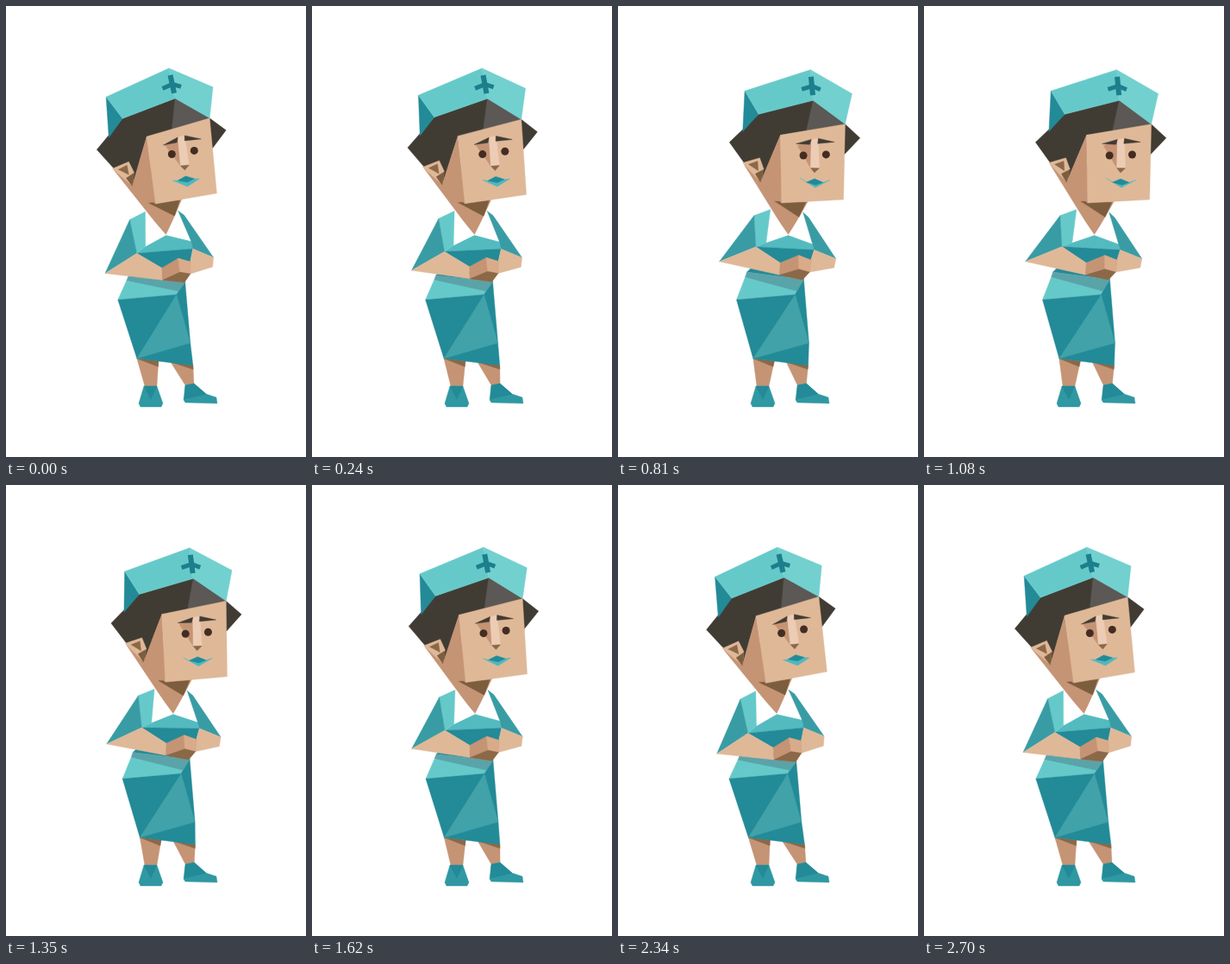
Animation of 348 by 522 pixels, one loop 3 s. Source, as an HTML page with a canvas:

```html
<!DOCTYPE html>
<html>
<head>
<meta charset="utf-8">
<style>
html, body { margin: 0; width: 100%; height: 100%; overflow: hidden; background: #fff; }
canvas { display: block; }
</style>
</head>
<body>
<canvas id="stage" width="348" height="522"></canvas>
<script>
const ctx = document.getElementById('stage').getContext('2d');
const STEP = 30, SWAY = 2700, LOOP = 3000;
const TEAL = '#238a97', MID = '#41a2a9', AQUA = '#66c9c9', PALE = '#72d0cf';
const SKIN = '#dfb898', TAN = '#c59475', BROWN = '#8a6848', OLIVE = '#7c5d3d', HAIR = '#403c34';

let lean = 0;
let warp;

const clamp = v => Math.max(0, Math.min(1, v));
const mix = (a, b, t) => [a[0] + (b[0] - a[0]) * t, a[1] + (b[1] - a[1]) * t];

// Head and neck turn rigidly about a point in the hips.
function turn([x, y]) {
  const angle = lean * 6.5 * Math.PI / 180;
  const dx = x - 191, dy = y - 367;
  return [191 + dx * Math.cos(angle) - dy * Math.sin(angle),
          367 + dx * Math.sin(angle) + dy * Math.cos(angle)];
}

// The chest turns too, while the folded arms rise and spread.
function chest([x, y]) {
  const rise = lean * clamp((y - 272) / 20);
  const [tx, ty] = turn([x, y]);
  return [tx + (x - 184) * 0.065 * rise, ty - 5 * rise];
}

// The hips slide over fixed feet and the waistband lifts.
function hips([x, y]) {
  return [x + lean * 7.5 * clamp((440 - y) / 50), y - lean * 5 * clamp((330 - y) / 15)];
}

function trace(points) {
  ctx.beginPath();
  for (const point of points) ctx.lineTo(...warp(point));
}

function facet(color, ...points) {
  trace(points);
  ctx.closePath();
  ctx.fillStyle = ctx.strokeStyle = color;
  ctx.lineWidth = 0.4;
  ctx.fill();
  ctx.stroke();
}

function bar(color, width, ...points) {
  trace(points);
  ctx.strokeStyle = color;
  ctx.lineWidth = width;
  ctx.stroke();
}

function dot(color, center, r) {
  ctx.beginPath();
  ctx.arc(...warp(center), r, 0, 7);
  ctx.fillStyle = color;
  ctx.fill();
}

function leg(hemLeft, hemRight, ankleRight, ankleLeft) {
  facet(TAN, hemLeft, hemRight, ankleRight, ankleLeft);
  facet(BROWN, hemLeft, hemRight, mix(hemRight, ankleRight, 0.22));
}

function lowerBody() {
  warp = hips;
  const heel = [160, 440], ankle = [175, 440], cuff = [208, 439], instep = [218, 437], toe = [232, 449];
  leg([152, 408], [177, 411], ankle, [161, 440]);
  leg([191, 412], [217, 416], instep, cuff);
  facet('#2f98a2', heel, ankle, [182, 460], [180, 464], [156, 464], [154, 460]);
  facet(TEAL, heel, ankle, [168, 455]);
  facet('#2f98a2', cuff, instep, toe, [244, 453], [245, 460], [208, 459], [206, 456]);
  facet(TEAL, cuff, instep, toe, [207, 455]);

  const waistLeft = [142, 313], waistRight = [208, 320], belt = [140, 318];
  const hip = [130, 340], knot = [198, 334], side = [214, 390], hemLeft = [152, 408], hemRight = [217, 416];
  facet(TEAL, waistLeft, [150, 305], [208, 312], waistRight);
  facet('#5aa3a8', waistLeft, waistRight, knot, belt);
  facet(AQUA, belt, mix(waistRight, knot, 0.75), knot, hip);
  facet(TEAL, hip, knot, waistRight, side, hemRight, hemLeft);
  facet(MID, knot, side, hemLeft);
}

function neck() {
  warp = turn;
  facet(TAN, [126, 190], [164, 180], [205, 222], [186, 266]);
  facet(OLIVE, [166, 228], [202, 225], [196, 243]);
}

function upperBody() {
  warp = chest;
  const collarLeft = [162, 238], collarRight = [200, 237], throat = [186, 265];
  const lapelLeft = [162, 278], lapelRight = [215, 272];
  const shoulderLeft = [144, 247], shoulderRight = [207, 242];
  const foldLeft = [152, 286], foldRight = [217, 281];
  const elbowLeft = [115, 309], elbowRight = [241, 291];
  const thumb = [181, 303], knuckle = [200, 292], wrist = [214, 296];
  const palm = [182, 317], fist = [214, 310], finger = [207, 320];

  facet('#53bbbf', lapelLeft, throat, lapelRight, foldRight, foldLeft);
  facet(TEAL, foldLeft, foldRight, wrist, thumb);
  facet('#fff', collarLeft, throat, lapelLeft);
  facet('#fff', collarRight, throat, lapelRight);
  facet(AQUA, collarLeft, shoulderLeft, foldLeft, lapelLeft);
  facet('#399ca4', shoulderLeft, foldLeft, elbowLeft);
  facet('#399ca4', collarRight, shoulderRight, elbowRight, foldRight, lapelRight);

  facet(SKIN, elbowLeft, foldLeft, thumb, palm);
  facet(SKIN, foldRight, elbowRight, [240, 302], fist, wrist);
  facet(TAN, thumb, knuckle, wrist, fist, finger, palm);
  facet('#d9ab8a', knuckle, wrist, fist, [202, 308]);
  facet(BROWN, palm, [202, 308], fist, finger);
}

function head() {
  warp = turn;
  const temple = [164, 151], brow = [237, 130], chin = [245, 217], jaw = [174, 229];
  const hatLeft = [117, 105], hatTop = [190, 72], hatRight = [241, 94], brim = [136, 130], fold = [197, 107];
  const lobe = [147, 208], earTop = [143, 180];

  facet(HAIR, [106, 166], brim, fold, brow, [256, 144], mix(brow, chin, 0.4), temple, lobe, [125, 187]);
  facet('#5b5855', fold, brow, mix(temple, brow, 0.4));
  facet(TAN, temple, jaw, lobe);
  facet(SKIN, temple, brow, chin, jaw);
  facet(SKIN, [124, 188], earTop, [149, 192], lobe);
  facet(BROWN, [131, 189], [141, 184], [143, 195]);
  facet(OLIVE, [140, 199], [149, 193], lobe);

  facet(TEAL, hatLeft, brim, [120, 152]);
  facet(AQUA, hatLeft, hatTop, fold, brim);
  facet(PALE, hatTop, hatRight, brow, fold);
  bar('#1c7f8c', 6, [191.5, 80], [196, 101]);
  bar('#1c7f8c', 5, [182.5, 95.5], [194, 90.5], [204, 93.5]);
  face();
}

// Leaning out brings a smile: brows relax, mouth corners widen and rise.
function face() {
  const smile = 4 * lean;
  const bridgeLeft = [200, 152], bridgeRight = [208, 150], nostril = [203, 185], tip = [213, 184];
  facet(TAN, [185, 161], bridgeLeft, nostril);
  facet('#ecccb4', bridgeLeft, bridgeRight, tip, nostril);
  facet(BROWN, nostril, tip, [208, 190]);
  facet(HAIR, [183, 161 - smile / 2], bridgeLeft, [199, 158]);
  facet(HAIR, bridgeRight, [227, 154 - smile / 2], [208, 156]);
  for (const eye of [[193, 171.5], [219, 167.5]]) dot('#432d23', eye, 4.5);

  const lipLeft = [200, 202], lipTop = [209, 197], lipRight = [219, 200];
  facet('#4fb8bd', [194 - smile / 2, 202 - smile], lipLeft, lipTop, lipRight,
    [225 + smile / 2, 200 - smile], [211, 209 - smile / 2]);
  facet(TEAL, lipLeft, lipTop, lipRight, [211, 204]);
}

function render(now) {
  const time = Math.floor(now % LOOP / STEP) * STEP;
  const angle = (Math.min(time, SWAY) - 950) / SWAY * 2 * Math.PI;
  lean = 0.355 + 0.6 * Math.cos(angle) + 0.092 * Math.cos(2 * angle);
  ctx.clearRect(0, 0, 348, 522);
  lowerBody();
  neck();
  upperBody();
  head();
  requestAnimationFrame(() => render(performance.now()));
}

render(0);
</script>
</body>
</html>
```
